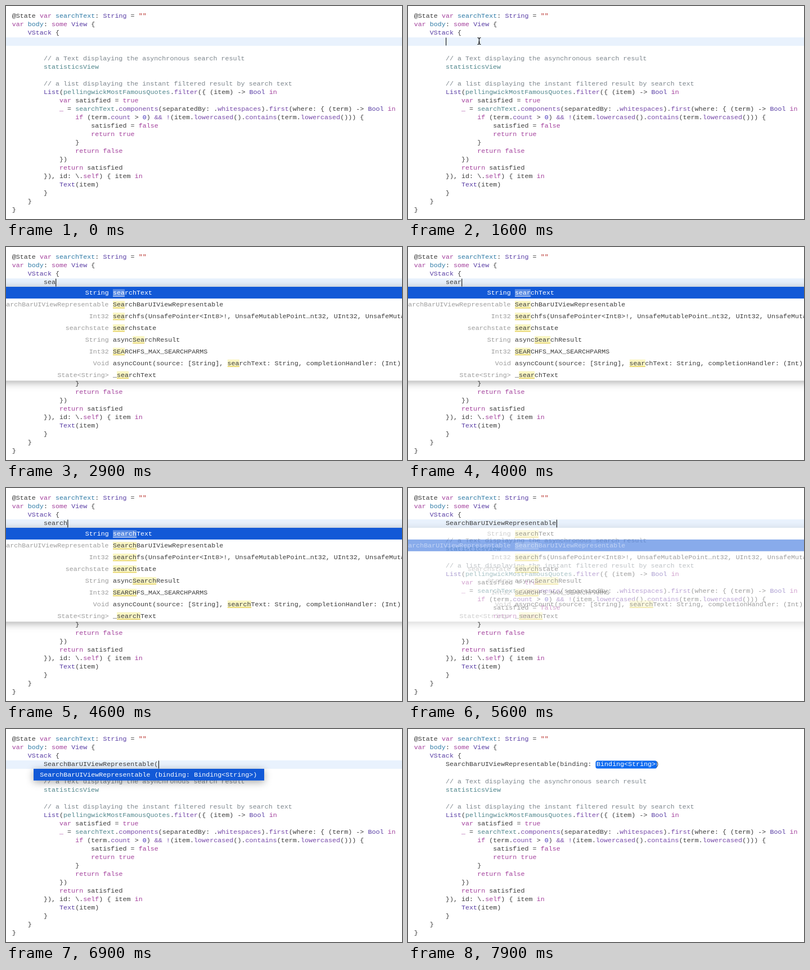
Animation, 704 px wide and 380 px high, one loop 8 s. Source, as an HTML page with a canvas:

```html
<!DOCTYPE html>
<html lang="en">
<head>
<meta charset="utf-8">
<title>Code completion</title>
<style>
  html, body { margin: 0; width: 100%; height: 100%; overflow: hidden; background: #fff; }
  canvas { display: block; }
</style>
</head>
<body>
<canvas id="stage" width="704" height="380"></canvas>
<script>
const ctx = document.getElementById('stage').getContext('2d');
const W = 704, H = 380, LOOP = 8000, STEP = 100;
const CHAR = 7.03, LEFT = 10.7, LINE = 15.05, BASE = 21.3;
const ROW = 20.9, POP_TOP = 71;
const EDIT_X = LEFT + 8 * CHAR;
const INK = '#3c3c3c';

const code = String.raw`@State var searchText: String = ""
var body: some View {
    VStack {


        // a Text displaying the asynchronous search result
        statisticsView

        // a list displaying the instant filtered result by search text
        List(pellingwickMostFamousQuotes.filter({ (item) -> Bool in
            var satisfied = true
            _ = searchText.components(separatedBy: .whitespaces).first(where: { (term) -> Bool in
                if (term.count > 0) && !(item.lowercased().contains(term.lowercased())) {
                    satisfied = false
                    return true
                }
                return false
            })
            return satisfied
        }), id: \.self) { item in
            Text(item)
        }
    }
}`.split('\n');

// First matching rule gives a token its colour
const rules = [
  [/^\/\//, '#7d868d'],
  [/^"/, '#b8312c'],
  [/^@State$/, INK],
  [/^(var|some|in|if|return|true|false|self|_)$/, '#a3409c'],
  [/^(String|View|VStack|List|Text|Bool)$/, '#583da4'],
  [/^(filter|components|whitespaces|first|count|lowercased|contains|&&|!)$/, '#7548a8'],
  [/^(statisticsView|searchText|pellingwickMostFamousQuotes)$/, '#4f858b'],
  [/^0$/, '#4030b8']
];
const tokens = /\/\/.*|"[^"]*"|@?\w+|&&|[^\s\w]/g;

const NAME = 'SearchBarUIViewRepresentable';
const TOKEN = 'Binding<String>';

const shortList = [
  ['ContentView', 'self'], ['SearchBarUI…epresentable', NAME], ['Section', 'Section'],
  ['String', 'searchText'], ['Set', 'Set'], ['sem', 'sem'], ['Int32', 'sem_t'], ['semun', 'semun']
];
const searchList = [
  ['String', 'searchText'], [NAME, NAME],
  ['Int32', 'searchfs(UnsafePointer<Int8>!, UnsafeMutablePoint…nt32, UInt32, UnsafeMutableRawPointer!)'],
  ['searchstate', 'searchstate'], ['String', 'asyncSearchResult'],
  ['Int32', 'SEARCHFS_MAX_SEARCHPARMS'],
  ['Void', 'asyncCount(source: [String], searchText: String, completionHandler: (Int) -> Void)'],
  ['State<String>', '_searchText']
];
const initList = [[NAME, `(binding: ${TOKEN})`]];

const edits = [
  [0, ''], [2100, 's'], [2300, 'se'], [2800, 'sea'], [4000, 'sear'], [4200, 'searc'],
  [4400, 'search'], [5600, NAME], [6200, NAME + '('], [7200, NAME + '(binding: ']
];

function write(text, x, y, color) {
  ctx.fillStyle = color;
  ctx.fillText(text, x, y);
}

function rect(x, y, w, h, color) {
  ctx.fillStyle = color;
  ctx.fillRect(x, y, w, h);
}

function drawCode() {
  code.forEach((line, i) => {
    for (const { 0: text, index } of line.matchAll(tokens)) {
      const declared = i < 2 && /^(searchText|body)$/.test(text);
      const rule = rules.find(([pattern]) => pattern.test(text));
      const color = declared ? '#2f7ba6' : rule ? rule[1] : INK;
      write(text, LEFT + index * CHAR, BASE + i * LINE, color);
    }
  });
}

// The shadow is clipped to the outside so that it never shows through the fading panel
function drawShadow(x, y, w, h) {
  ctx.save();
  ctx.beginPath();
  ctx.rect(0, 0, W, H);
  ctx.rect(x, y, w, h);
  ctx.clip('evenodd');
  ctx.shadowColor = 'rgba(0,0,0,.35)';
  ctx.shadowBlur = 14;
  ctx.shadowOffsetY = 3;
  rect(x, y, w, h, '#fff');
  ctx.restore();
}

function drawPopup({ rows, query, selected, left, width, textX, alpha }) {
  const height = ROW * rows.length;
  ctx.save();
  ctx.globalAlpha = alpha;
  drawShadow(left, POP_TOP, width, height);
  rect(left, POP_TOP, width, height, '#fff');
  rect(left, POP_TOP + selected * ROW, width, ROW, '#1259d7');
  rows.forEach(([type, text], i) => {
    const active = i === selected;
    const y = POP_TOP + 14.3 + i * ROW;
    const at = text.toLowerCase().indexOf(query);
    if (query && at >= 0) {
      const x = textX + at * CHAR, w = query.length * CHAR;
      rect(x, y - 10, w, 13, active ? 'rgba(255,255,255,.3)' : '#faf6c3');
      rect(x, y + 2, w, 1.3, active ? '#c3d3f2' : '#e3cd52');
    }
    write(type, textX - (type.length + 1) * CHAR, y, active ? '#fff' : '#9c9c9c');
    write(text, textX, y, active ? '#fff' : INK);
  });
  ctx.restore();
}

// Half-transparent on the first step, solid, then gone shortly after closing
function fade(t, open, close) {
  if (t < open || t >= close + 2 * STEP) return 0;
  if (t >= close) return t === close ? 0.5 : 0.2;
  return t === open ? 0.53 : 1;
}

function drawPopups(t, typed) {
  const wide = { left: -40, width: W + 80 };
  const alpha = fade(t, 2600, 5600);
  if (alpha && t < 2900) {
    drawPopup({ ...wide, rows: shortList, query: 'se', selected: 0, textX: 161.7, alpha });
  } else if (alpha) {
    const query = t < 5600 ? typed : 'search';
    drawPopup({ ...wide, rows: searchList, query, selected: t < 4800 ? 0 : 1, textX: 190, alpha });
  }
  const initAlpha = fade(t, 6500, 7200);
  if (initAlpha) {
    drawPopup({ rows: initList, query: '', selected: 0, left: 49, width: 410, textX: 264, alpha: initAlpha });
  }
}

function drawPointer(x, y) {
  ctx.strokeStyle = '#111';
  ctx.lineWidth = 1.2;
  ctx.beginPath();
  ctx.moveTo(x - 3, y - 6);
  ctx.quadraticCurveTo(x, y - 6, x, y - 3.5);
  ctx.lineTo(x, y + 3.5);
  ctx.quadraticCurveTo(x, y + 6, x - 3, y + 6);
  ctx.moveTo(x + 3, y - 6);
  ctx.quadraticCurveTo(x, y - 6, x, y - 3.5);
  ctx.moveTo(x, y + 3.5);
  ctx.quadraticCurveTo(x, y + 6, x + 3, y + 6);
  ctx.moveTo(x - 1.5, y + 2);
  ctx.lineTo(x + 1.5, y + 2);
  ctx.stroke();
}

function caretOn(t) {
  if (t < 2100) return (t >= 300 && t < 800) || (t >= 1300 && t < 1800);
  return t < 7200 && !(t >= 3400 && t < 4000);
}

function draw(now) {
  const t = Math.floor(now % LOOP / STEP) * STEP;
  const typed = edits.filter(([start]) => start <= t).pop()[1];
  const done = t >= 7200;
  const endX = EDIT_X + typed.length * CHAR;
  const y = BASE + 3 * LINE;

  rect(0, 0, W, H, '#fff');
  if (!done) rect(0, 56, W, 15, '#e9f2fd');
  ctx.font = '11.7px "Liberation Mono", "Courier New", monospace';
  drawCode();
  write(typed, EDIT_X, y, INK);
  if (done) {
    ctx.fillStyle = '#0f6bf0';
    ctx.beginPath();
    ctx.roundRect(333.5, 56.5, 109, 14, 3.5);
    ctx.fill();
    write(TOKEN, endX + 1, y, '#fff');
    write(')', endX + TOKEN.length * CHAR, y, INK);
  }
  drawPopups(t, typed);
  if (caretOn(t)) rect(endX + 0.1, 56.5, 1.2, 14, '#222');
  if (t >= 300 && t < 2100) drawPointer(126.5, 62.5);
  requestAnimationFrame(tick);
}

function tick() {
  draw(performance.now());
}
tick();
</script>
</body>
</html>
```
